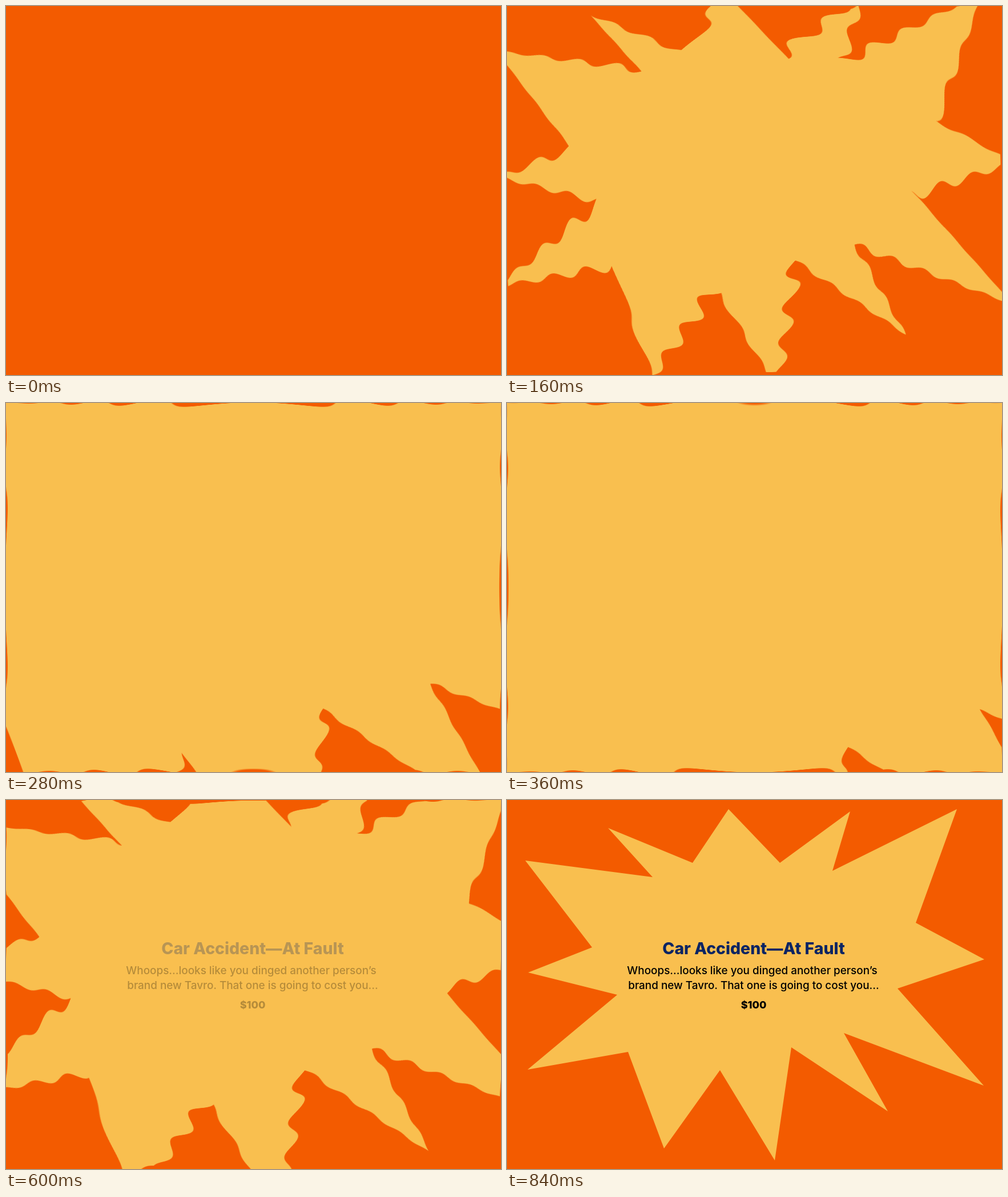
An HTML page with a canvas for the animation above (8000 ms loop, 867x646 px).

```html
<!DOCTYPE html>
<html lang="en">
<head>
<meta charset="utf-8">
<title>Car accident card</title>
<style>
  html, body { margin: 0; width: 100%; height: 100%; overflow: hidden; background: #f35b00; }
  canvas, svg { position: absolute; left: 0; top: 0; display: block; }
  text { font-family: Inter, "Open Sans", sans-serif; text-anchor: middle; }
  .title { font-size: 28.4px; font-weight: 800; fill: #0a2463; }
  .body { font-size: 18.9px; font-weight: 500; }
  .price { font-size: 18px; font-weight: 800; }
</style>
</head>
<body>
<canvas id="stage" width="867" height="646"></canvas>
<svg width="867" height="646" viewBox="0 0 867 646">
  <g id="copy" opacity="0">
    <text class="title" x="432" y="270">Car Accident—At Fault</text>
    <text class="body" x="429.5" y="305">Whoops...looks like you dinged another person’s</text>
    <text class="body" x="432" y="331">brand new Tavro. That one is going to cost you...</text>
    <text class="price" x="432" y="365">$100</text>
  </g>
</svg>
<script>
const W = 867, H = 646, CX = 433.5, CY = 323;
const LOOP = 8000, STEP = 40, PAD = 20, PW = W + 2 * PAD;
const BG = [243, 91, 0], STAR = [249, 191, 79], FLASH = [253, 170, 5];
const POINTS = [
  [32, 106], [255, 135], [177, 49], [325, 110], [388, 16], [478, 110],
  [601, 20], [570, 124], [788, 16], [716, 215], [836, 279], [684, 330],
  [835, 500], [590, 408], [667, 545], [498, 433], [469, 631], [373, 473],
  [275, 610], [212, 441], [36, 472], [193, 341], [37, 302], [149, 258]
];

const copy = document.getElementById('copy');
const ctx = document.getElementById('stage').getContext('2d');
const image = ctx.createImageData(W, H);
image.data.fill(255);

// The mask holds the unrippled star, clipped to the stage, with a clear border.
const mask = document.createElement('canvas');
mask.width = PW;
mask.height = H + 2 * PAD;
const mctx = mask.getContext('2d', { willReadFrequently: true });

const radius = new Float32Array(W * H);
for (let y = 0, i = 0; y < H; y++)
  for (let x = 0; x < W; x++) radius[i++] = Math.hypot(x + 0.5 - CX, y + 0.5 - CY);

const clamp = v => Math.max(0, Math.min(1, v));

function starScale(t) {
  if (t < 480) return Math.min(0.00705 * t, 3.06);
  const left = 1 - clamp((t - 480) / 200);
  return 1 + 2.06 * left * left;
}

function drawMask(scale) {
  mctx.clearRect(0, 0, mask.width, mask.height);
  mctx.save();
  mctx.translate(PAD, PAD);
  mctx.beginPath();
  mctx.rect(0, 0, W, H);
  mctx.clip();
  mctx.beginPath();
  for (const [x, y] of POINTS) mctx.lineTo(CX + (x - CX) * scale, CY + (y - CY) * scale);
  mctx.fill();
  mctx.restore();
  return mctx.getImageData(0, 0, mask.width, mask.height).data;
}

// Circular ripple that pushes every pixel along the diagonal.
function drawStar(t) {
  const src = drawMask(starScale(t)), out = image.data;
  const color = t >= 400 && t < 520 ? FLASH : STAR;
  const amp = t < 820 ? 18 : 0;
  for (let y = 0, i = 0; y < H; y++) {
    for (let x = 0; x < W; x++, i++) {
      const r = radius[i];
      const d = amp && r < 540 ? amp * (1 - r / 540) * Math.sin(0.11 * r - 0.0379 * t) : 0;
      const n = Math.floor(-d), f = -d - n;
      const p = ((y + PAD + n) * PW + x + PAD + n) * 4 + 3;
      const q = p + PW * 4;
      const top = src[p] * (1 - f) + src[p + 4] * f;
      const low = f ? src[q] * (1 - f) + src[q + 4] * f : 0;
      const a = (top * (1 - f) + low * f) / 255;
      for (let c = 0; c < 3; c++) out[i * 4 + c] = BG[c] + (color[c] - BG[c]) * a;
    }
  }
  ctx.putImageData(image, 0, 0);
}

let shown = -1;
function render(time) {
  const t = Math.min(840, Math.floor((time % LOOP) / STEP) * STEP);
  if (t === shown) return;
  shown = t;
  drawStar(t);
  copy.setAttribute('opacity', clamp((t - 520) / 300));
}

const start = performance.now();
function tick() {
  render(performance.now() - start);
  requestAnimationFrame(tick);
}
tick();
</script>
</body>
</html>
```
